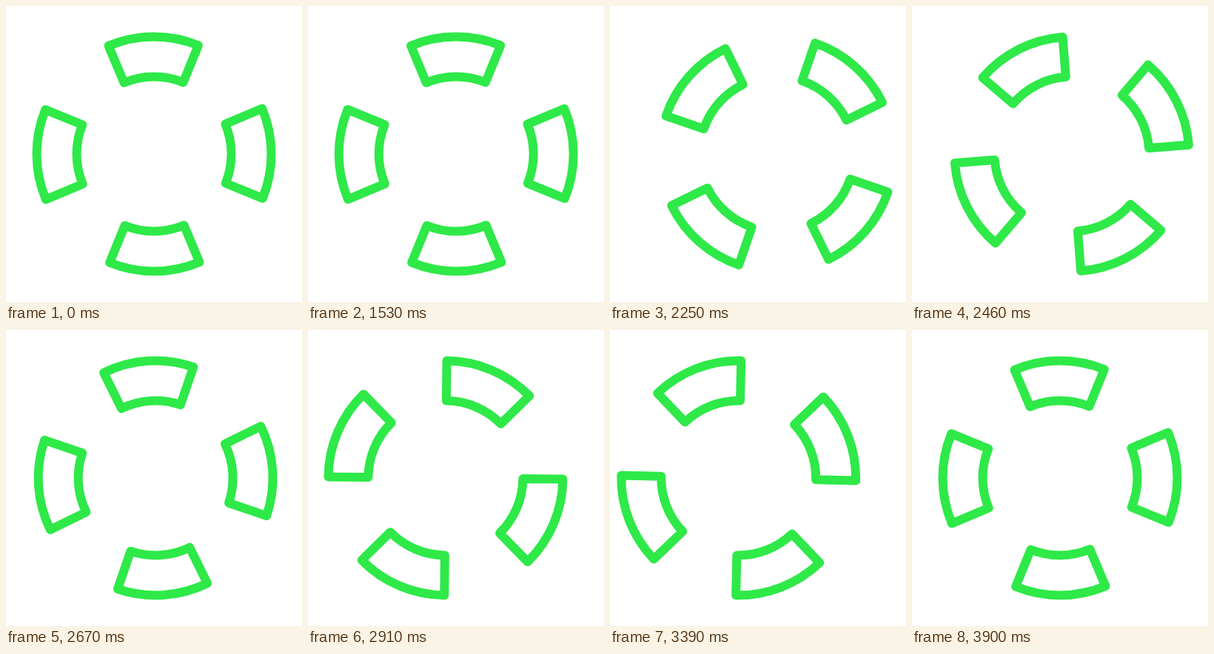
Animation, 400 px wide and 400 px high, one loop 3930 ms. Source, as an HTML page with a canvas:

```html
<!DOCTYPE html>
<html lang="en">
<head>
<meta charset="utf-8">
<title>Rolling ring</title>
<style>
  html, body { margin: 0; width: 100%; height: 100%; overflow: hidden; background: #fff; }
  canvas { display: block; width: 400px; height: 400px; }
</style>
</head>
<body>
<canvas id="stage" width="400" height="400"></canvas>
<script>
const ctx = document.getElementById('stage').getContext('2d');
const LOOP = 3930, STEP = 30, START = 1500, DURATION = 2400;
const OUTER = 158.5, INNER = 104.5, SWING = 28, TILT = -0.3;
const HALF = Math.PI / 8;

const smooth = p => p * p * (3 - 2 * p);
const mix = (a, b, p) => a + (b - a) * smooth(p);

// Out to the right, across to the left, then home.
function shift(p) {
  if (p < 0.25) return mix(0, SWING, p * 4);
  if (p < 0.75) return mix(SWING, -SWING, (p - 0.25) * 2);
  return mix(-SWING, 0, (p - 0.75) * 4);
}

function drawSegment(mid) {
  ctx.beginPath();
  ctx.arc(0, 0, OUTER, mid - HALF, mid + HALF);
  ctx.arc(0, 0, INNER, mid + HALF, mid - HALF, true);
  ctx.closePath();
  ctx.stroke();
}

function draw(time) {
  const p = Math.min(1, Math.max(0, (time - START) / DURATION));
  ctx.setTransform(1, 0, 0, 1, 0, 0);
  ctx.fillStyle = '#fff';
  ctx.fillRect(0, 0, 400, 400);
  ctx.translate(200 + shift(p), 200);
  ctx.rotate((TILT + 180 * smooth(p)) * Math.PI / 180);
  ctx.strokeStyle = '#2ee948';
  ctx.lineWidth = 12;
  ctx.lineJoin = 'round';
  for (let i = 0; i < 4; i++) drawSegment(i * Math.PI / 2);
}

const origin = performance.now();
function frame() {
  const time = (performance.now() - origin) % LOOP;
  draw(Math.floor(time / STEP) * STEP);
  requestAnimationFrame(frame);
}
frame();
</script>
</body>
</html>
```
